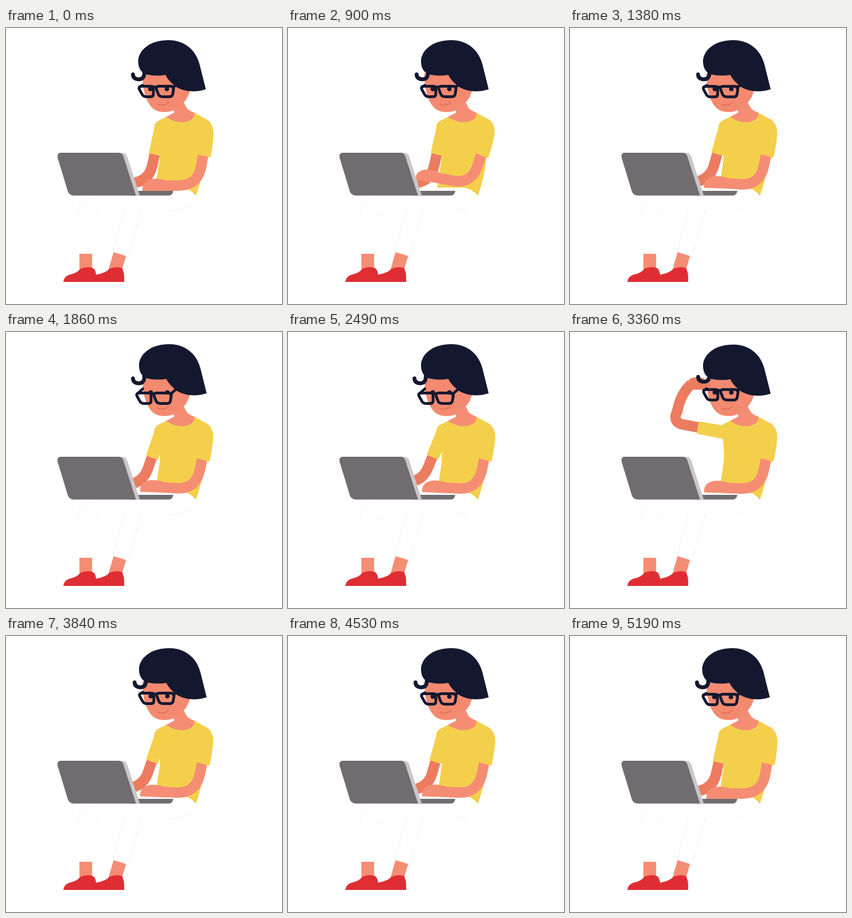
Recreate the animation shown at these times as an HTML page. Size 500 by 500 pixels, loop 5220 ms.

```html
<!DOCTYPE html>
<html lang="en">
<head>
<meta charset="utf-8">
<title>Typing at a laptop</title>
<style>
  html, body { margin: 0; width: 100%; height: 100%; overflow: hidden; background: #fff; }
  svg { display: block; width: 100vw; height: 100vh; }
  .navy { fill: #14182f; }
  .line { fill: none; stroke: #14182f; stroke-width: 5; stroke-linejoin: round; stroke-linecap: round; }
  .shirt { fill: #f4cf4b; }
  .skin { fill: #f58d74; }
  .face { fill: #f38a70; }
  .shade { fill: #ec7b60; }
  .shoe { fill: #e02d33; }
  .limb { fill: none; stroke-width: 19; }
  .limb.skin { stroke: #f58d74; }
  .limb.shade { stroke: #ec7b60; }
  .seam { fill: none; stroke: #999; stroke-width: .6; stroke-dasharray: 1 4; }
</style>
</head>
<body>
<svg viewBox="0 0 500 500">
  <!-- head -->
  <path class="face" d="M247 82L248 103C252 130 262 151 283 152Q295 153 303 149L321 136Q331 126 334 110L300 80Z"/>
  <path d="M275 138Q287 143 295 134" fill="none" stroke="#db6a58" stroke-width="2" opacity=".75"/>
  <g id="eyes" class="navy"><circle cx="261.500" cy="110.500" r="4"/><circle cx="291.500" cy="110.500" r="4"/></g>

  <!-- far arm -->
  <path id="farArm" class="limb shade"/>
  <path id="farHand" class="shade" d="M-4 -9Q8 -16 20 -13Q27 -9 37 -1Q30 5 20 8L4 10Q-7 10 -9 3Z"/>

  <path id="leftTemple" class="line"/>
  <path id="rightTemple" class="line"/>
  <g id="glasses" class="line">
    <path d="M245 105.500H263Q267 105.500 267 110V120Q267 124.500 262 124.500H254Q249 124.500 246.500 120L241.500 111Q239.500 106 245 105.500Z"/>
    <path d="M276 105.500H299Q304.500 105.500 303.500 111L302 120Q301 124.500 296 124.500H284Q278 124.500 276 120L272.500 111Q271 106 276 105.500Z"/>
    <path d="M267 107H273"/>
  </g>
  <path id="hair" class="navy" d="M254 84C243 80 239 70 239.500 58C242 37 264 22 294 22C328 22 346 45 351 67L362 111C345 117 322 116 307 106C298 98 292 92 289 85Q270 88 254 84Z"/>
  <path id="curl" class="line" style="stroke-width:7" d="M250.500 80C251 89 247 93 240 93Q230 92 230 84"/>

  <!-- torso -->
  <path id="farSleeve" class="shirt"/>
  <path class="shirt" d="M290 161L276 168Q269 171 268.500 181L277 195Q281 224 277 246L268 304H344Q357 268 359 236L374 190Q375 174 364 166L341 153Z"/>
  <path class="skin" d="M303 148L321 133L328 146Q334 151 341 153.500Q343 163 332 168Q312 176 290 161L305 153Z"/>

  <!-- legs -->
  <path fill="#fff" d="M238 297Q255 289.500 275 289H318Q334 291 344 304V310H238Z"/>
  <path class="seam" d="M130 340Q134 308 160 304M214 331L194 405M245 331L222 410M300 331Q325 330 335 318M160 340Q162 335 169 334"/>
  <path class="skin" d="M133 409H156V440H133ZM195 406L217.500 413L209 442L185 440Z"/>
  <path class="shoe" d="M104 460Q105 448.500 119 446Q129 443.500 135 436Q147 431 158 435Q163 440 163 447Q180 444 188 436Q200 431 210 435Q215 442 214 460Z"/>

  <!-- laptop base, near arm, screen -->
  <path fill="#716c70" d="M236 295H303Q302 303.500 295 303.500H236Z"/>
  <path id="nearArm" class="limb skin"/>
  <path id="nearHand" class="skin" d="M6 -9.500C-10 -14 -25 -14 -33 -6C-37 -2 -38 3 -38 9.500H6Z"/>
  <path id="nearSleeve" class="shirt" d="M345 160L364 166Q376 174 376 192Q375 212 370.500 234.500L347.500 229L340 185Z"/>
  <path fill="#c9c7c9" d="M200 226H211Q218 226.500 220 234L242.500 304H225Z"/>
  <path fill="#716c70" d="M98 226H205Q211 226.500 213 234L235.500 303.500H122Q114.500 303 112 296L93.500 235Q92 227 98 226Z"/>
</svg>
<script>
const LOOP = 5220, STEP = 30, KEYSTROKES = 22;
const part = Object.fromEntries([...document.querySelectorAll('[id]')].map(e => [e.id, e]));
const set = (name, attr, value) => part[name].setAttribute(attr, value);
const shift = (name, x, y) => set(name, 'transform', `translate(${x} ${y})`);
const place = (name, point, deg) => set(name, 'transform', `translate(${point}) rotate(${deg})`);

const mix = (a, b, k) => a + (b - a) * k;
const ease = (t, from, to) => {
  const u = Math.min(1, Math.max(0, (t - from) / (to - from)));
  return u * u * (3 - 2 * u);
};
// Eases from 0 to 1, holds, and eases back to 0.
const hold = (t, start, full, leave, end) => ease(t, start, full) - ease(t, leave, end);

const polar = ([x, y], deg, len) =>
  [x + len * Math.cos(deg * Math.PI / 180), y + len * Math.sin(deg * Math.PI / 180)];

// Two bones joined by a soft elbow; bulge bows the second one sideways.
function limb(from, elbow, to, radius, bulge = 0) {
  const near = p => {
    const k = radius / Math.hypot(p[0] - elbow[0], p[1] - elbow[1]);
    return [mix(elbow[0], p[0], k), mix(elbow[1], p[1], k)];
  };
  const bend = near(to);
  const middle = [(bend[0] + to[0]) / 2 - bulge, (bend[1] + to[1]) / 2 - bulge * .7];
  return `M${from}L${near(from)}Q${elbow} ${bend}Q${middle} ${to}`;
}

function drawHead(t, raise) {
  const turn = hold(t, 0, 900, 4530, 5190);
  const lookUp = hold(t, 2880, 3700, 3900, 5190);
  const slip = hold(t, 1300, 1800, 2880, 2970);
  const sway = turn * (1 + 2 * Math.cos((t - 900) / 2900 * 2 * Math.PI));
  const faceX = .8 * turn, faceY = -2 * lookUp;
  const x = faceX - 5 * slip, y = faceY + 5 * slip;
  shift('hair', 1.5 * turn, .8 * raise);
  shift('curl', sway, -3 * raise);
  shift('eyes', faceX, faceY * .7 - slip);
  shift('glasses', x, y);
  set('leftTemple', 'd', `M${242 + x} ${107 + y}L${247 + faceX} ${104 + faceY - slip}`);
  set('rightTemple', 'd', `M${302 + x} ${108 + y}L311 ${101 + faceY}`);
}

function drawFarArm(t, raise, tap) {
  const lean = hold(t, 900, 1860, 3840, 5190);
  const shoulder = [280, 181];
  const upper = mix(102.5 + 6.5 * lean, 193.6, raise);
  const fore = mix(172 + 3 * lean + tap, 303, raise);
  const elbow = polar(shoulder, upper, 98);
  const wrist = polar(elbow, fore, 79);
  const cuff = polar(shoulder, upper, 49);
  const across = (point, width) => polar(point, upper + 90, width);
  set('farArm', 'd', limb(cuff, elbow, wrist, mix(28, 24, raise), 8 * raise));
  place('farHand', wrist, fore + mix(30, 72, raise));
  set('farSleeve', 'd', `M${across(shoulder, 11)}L${across(cuff, 11)}L${across(cuff, -12)}L${across(shoulder, -13)}Z`);
}

function drawNearArm(t, tap) {
  const typing = hold(t, 900, 1260, 4620, 5160);
  const swing = 2 * typing + 8 * hold(t, 560, 860, 960, 1260);
  const shoulder = [357, 178];
  const cuff = polar(shoulder, 89 + swing, 48);
  const elbow = polar(shoulder, 95 + swing, 108);
  const wrist = [285 - 2 * swing, 285.5 - 1.8 * swing + .6 * tap * typing];
  set('nearArm', 'd', limb(cuff, elbow, wrist, 36));
  place('nearHand', wrist, swing);
  set('nearSleeve', 'transform', `rotate(${swing} ${shoulder})`);
}

function frame(now) {
  const t = Math.floor(now % LOOP / STEP) * STEP;
  const raise = hold(t, 2430, 2940, 3300, 3780);
  const tap = Math.sin(t / LOOP * KEYSTROKES * 2 * Math.PI);
  drawHead(t, raise);
  drawFarArm(t, raise, tap);
  drawNearArm(t, tap);
}

const start = performance.now();
function tick() {
  frame(performance.now() - start);
  requestAnimationFrame(tick);
}
tick();
</script>
</body>
</html>
```
